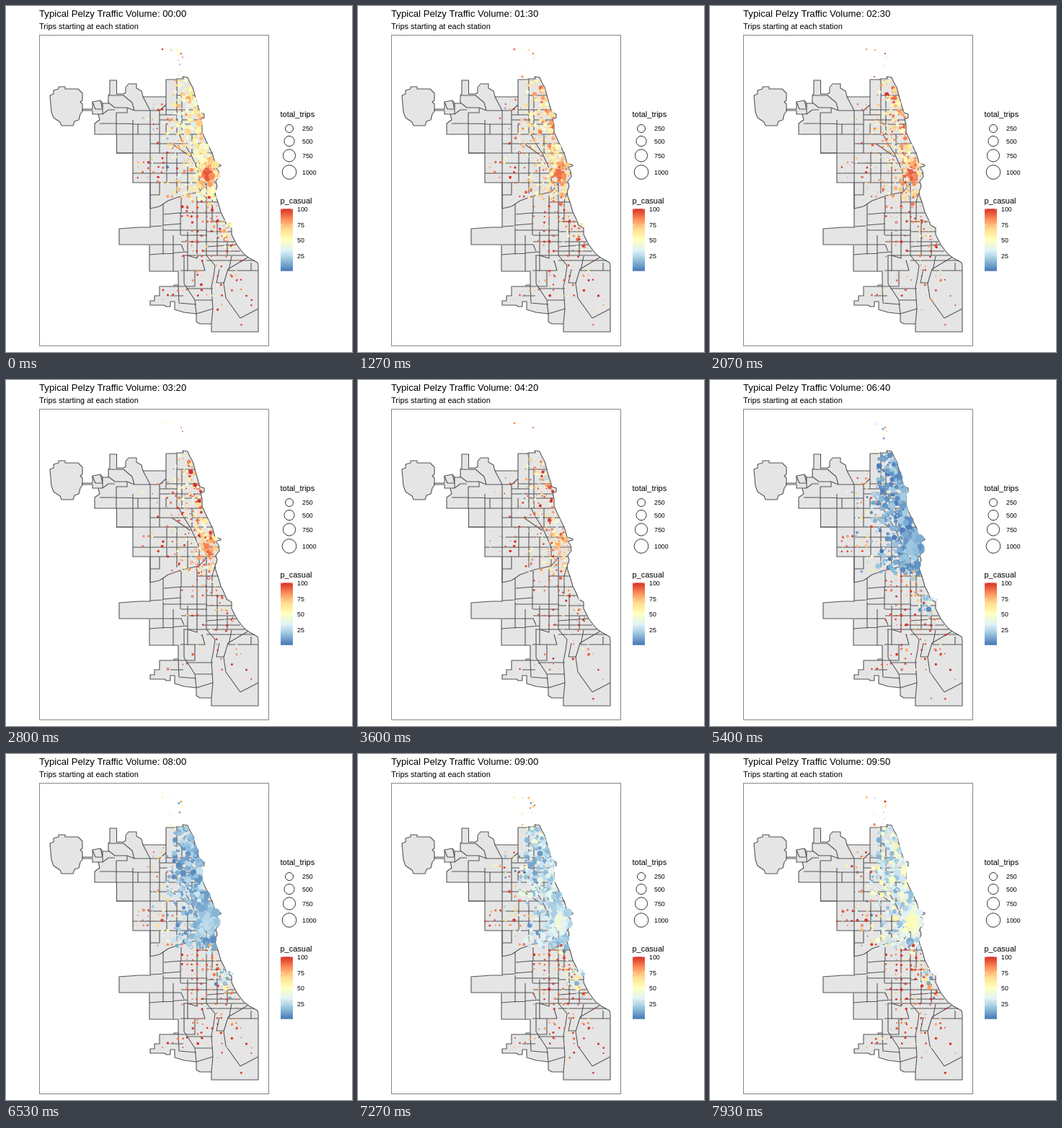
Write an HTML page that moves like this. It is 480 by 480 pixels and loops after 8000 ms.

```html
<!DOCTYPE html>
<html lang="en">
<head>
<meta charset="utf-8">
<title>Traffic volume map</title>
<style>
html, body { margin: 0; width: 100%; height: 100%; overflow: hidden; background: #fff; }
svg { display: block; width: 100vw; height: 100vh; }
text { font-family: "Liberation Sans", Arial, sans-serif; font-size: 11px; fill: #000; }
.title { font-size: 13.2px; }
.label { font-size: 8.8px; }
.map { fill: #e5e5e5; stroke: #555; stroke-width: 1.1; stroke-linejoin: round; }
.lines { fill: none; }
</style>
</head>
<body>
<svg viewBox="0 0 480 480">
  <defs><linearGradient id="ramp" x1="0" y1="1" x2="0" y2="0"></linearGradient></defs>
  <rect width="480" height="480" fill="#fff"/>
  <text class="title" id="title" x="46" y="15"></text>
  <text x="46" y="32">Trips starting at each station</text>
  <g class="map" id="map"></g>
  <g id="dots"></g>
  <rect x="46.5" y="40.5" width="318" height="431" fill="none" stroke="#858585"/>
  <g id="legend">
    <text x="380.5" y="154">total_trips</text>
    <text x="380.5" y="274">p_casual</text>
    <rect x="381" y="281.3" width="17" height="86.4" fill="url(#ramp)"/>
  </g>
</svg>
<script>
const FRAMES = 120, STEP = 8000 / FRAMES, MINUTES = 4.965;
const $ = id => document.getElementById(id);

function add(parent, tag, attrs, text) {
  const el = document.createElementNS('http://www.w3.org/2000/svg', tag);
  for (const key in attrs) el.setAttribute(key, attrs[key]);
  if (text) el.textContent = text;
  return parent.appendChild(el);
}

const mix = (a, b, f) => a + (b - a) * f;
const clamp = (v, lo, hi) => Math.max(lo, Math.min(hi, v));

// Rows are sorted by their first value; all columns are interpolated.
function sample(rows, v) {
  let i = 1;
  while (i < rows.length - 1 && rows[i][0] < v) i++;
  const a = rows[i - 1], b = rows[i];
  const f = clamp((v - a[0]) / (b[0] - a[0]), 0, 1);
  return a.map((n, c) => mix(n, b[c], f));
}

function hash(a, b) {
  let h = Math.imul(a + 1, 0x9E3779B1) ^ Math.imul(b + 7, 0x85EBCA6B);
  h = Math.imul(h ^ h >>> 15, 0x2C1B3C6D);
  h = Math.imul(h ^ h >>> 12, 0x297A2D39);
  return ((h ^ h >>> 15) >>> 0) / 4294967296;
}

// Map: shoreline rows are [y, x].
const shore = [
  [99, 252], [106, 255], [113, 259], [120, 261], [128, 263], [138, 266], [148, 269],
  [150, 275], [155, 275], [157, 270], [165, 272], [175, 272], [186, 277], [196, 282],
  [207, 287], [218, 290], [220.5, 298], [222, 298], [224, 291], [229, 295], [237, 296],
  [243, 291], [250, 293], [258, 290], [264, 291], [272, 294], [286, 298], [296, 303],
  [304, 306], [308, 313], [317, 313], [323, 316], [331, 320], [339, 326], [345, 331],
  [350, 338], [356, 349]
];
const airport = 'M61 124l5-2v-5l7-2v-3h9v3h18l3 3 3 3v10l-3 2 3 3v10l-3 4-2 8-6 2-2 6H77l-2-5-9-6-3-8z';
const north = 'M106 143H120V133L131 131L134 135H142V124L144 122V103H153.5V122H163L166 120V113L170 108H181V114L188 118L190 126H222V102H236V101H246L245 98';
const south = 'L350 361V452H285V441H269L264 438V427L247 425L234 421V410H228V417H222L220 415H200V409H206V402H213V389H233V387H239V368H199V331H157V309L185 307H200V245H176V204H153.5V178H123V163L130 158L128 150H120V145H106z';
const areas = [
  'M120 133L124 143H134L131 131M134 135V150H128M142 124H163L175 134L178 145M142 134L151 141H168V148H153V178M168 141L178 145H200L190 126M134 150L142 144H151M130 163H153L200 164M153 178H272M176 158V204M153 204H287M183 164V178M200 145V281',
  'M200 145H213L222 137V126M213 145V151H222V137M222 144H267M237 102V178M237 124H262M244 124V178M237 158H270M222 151H237M200 164H213V158H237M213 151V204M222 164V178M237 164H272M200 191H252M240 178L247 191L256 205L262 218L268 232V258M230 191L256 209M256 191H279M258 178V204',
  'M176 232H295M200 218H290M223 204V245M237 204V260M200 245H291M252 218V262M213 245V262H200M200 281L213 278L225 270L245 263L268 258L278 246M218 275V305L200 306M219 289L242 287V318M243 263V287H298M265 259V313M278 246V346M290 258L286 272V300M265 272H294M278 299H304M278 286V313',
  'M218 304L243 302M218 311H279M243 318H279M200 331H243L247 340M218 307V345M199 345L252 341M252 313V346M232 318V368M265 313V350L252 346V368M243 327H317M293 299V346M278 313H313M246 346H331M272 340H325M307 327V346M278 334L320 331',
  'M278 346L290 360L288 375L285 390L287 420L285 441M335 349L308 365L302 385L305 405L325 433M313 347L309 367H350M278 353H345M242 367H276L272 353M247 346V385L262 408L264 427M239 387L240 412L264 414M250 392H287M262 408H287M264 427L287 420M233 389H262V367M296 365L292 384H302M228 402H246M325 433L350 420M340 356V367'
];
add($('map'), 'path', { d: airport });
add($('map'), 'path', { d: north + shore.map(([y, x]) => `L${x} ${y}`).join('') + south });
add($('map'), 'path', { class: 'lines', d: areas.join('') });

// Colour scale
const ramp = [[69, 117, 180], [145, 191, 219], [224, 243, 248], [255, 255, 191],
  [254, 224, 144], [252, 141, 89], [215, 48, 39]].map((rgb, i) => [i / 6 * 100, ...rgb]);
const color = p => `rgb(${sample(ramp, p).slice(1).map(Math.round)})`;
ramp.forEach(([p]) => add($('ramp'), 'stop', { offset: p + '%', 'stop-color': color(p) }));

// Legend
[[250, 170, 5.5], [500, 187.5, 7.1], [750, 207.5, 8.6], [1000, 230.5, 9.8]].forEach(([n, y, r]) => {
  add($('legend'), 'circle', { cx: 393, cy: y, r, fill: 'none', stroke: '#000', 'stroke-width': .8 });
  add($('legend'), 'text', { class: 'label', x: 411, y: y + 3.2 }, n);
});
[100, 75, 50, 25].forEach((n, i) => {
  const y = 282 + i * 21.6;
  add($('legend'), 'path', { d: `M381 ${y}h3.4M394.6 ${y}h3.4`, stroke: '#fff', 'stroke-width': .5 });
  add($('legend'), 'text', { class: 'label', x: 404, y: y + 3.2 }, n);
});

// Stations
let seed = 0;
const rand = () => hash(seed++, 991);
const bell = () => (rand() + rand() + rand() + rand() - 2) * 1.7;
const lakeX = y => sample(shore, y)[1];
const snap = v => Math.round(v / 6.8) * 6.8 + (rand() - .5) * 2.4;
const stations = [];

function place(count, kind, spot) {
  for (let i = 0; i < count; i++) {
    const [x, y] = spot(i);
    const loop = Math.exp(-(((x - 281) / 9) ** 2) - ((y - 232) / 15) ** 2);
    const coast = Math.exp(-Math.max(0, lakeX(y) - x) / 24);
    stations.push({ x, y, kind, loop, coast, id: stations.length, u: rand(), order: rand() });
  }
}
const box = (x0, x1, y0, y1) => () => [snap(mix(x0, x1, rand())), snap(mix(y0, y1, rand()))];

const suburb = [[217, 60], [229, 61], [237, 61], [243, 66], [240, 68], [245, 71], [239, 75],
  [243, 73], [228, 83], [241, 81], [242, 90], [228, 98], [235, 103], [239, 96]];
place(suburb.length, 'edge', i => suburb[i]);
place(310, 'core', () => {
  const y = mix(102, 268, rand() ** .9);
  return [lakeX(y) - 3 - rand() ** 1.2 * Math.min(56, 18 + (y - 102) * .4), y];
});
place(85, 'core', () => {
  const y = 224 + bell() * 17;
  return [Math.min(lakeX(y) - 3, 273 + bell() * 9), y];
});
place(75, 'west', box(204, 236, 130, 266));
place(6, 'west', box(193, 204, 155, 166));
place(17, 'far', box(176, 200, 216, 240));
place(28, 'hyde', () => [302 + bell() * 6, 312 + bell() * 8]);
place(40, 'coast', () => {
  const y = mix(264, 344, rand());
  return [lakeX(y) - 3 - rand() * 20, y];
});
place(85, 'far', () => {
  const y = mix(268, 352, rand());
  return [snap(mix(243, lakeX(y) - 5, rand())), snap(y)];
});
place(44, 'far', box(247, 333, 345, 412));
place(9, 'far', box(218, 250, 392, 412));
place(12, 'far', box(268, 347, 385, 447));

stations.sort((a, b) => a.order - b.order);
stations.forEach(s => { s.el = add($('dots'), 'circle', { cx: s.x.toFixed(1), cy: s.y.toFixed(1) }); });

// hour, size, core share, loop share, spread, share of active stations, share of rings
const day = [
  [0, .78, 57, 97, 19, .84, .14],
  [1.5, .68, 67, 92, 20, .72, .25],
  [2.5, .62, 71, 94, 23, .62, .25],
  [4.33, .52, 76, 80, 40, .5, .28],
  [5.5, .7, 34, 48, 25, .66, .14],
  [6.67, 1.02, 12, 20, 10, .82, .05],
  [8, 1.05, 17, 24, 11, .87, .05],
  [9.83, 1, 34, 56, 17, .92, .06]
];
// pull towards 96 percent, extra spread
const kinds = { core: [0, 0], edge: [.35, 22], west: [.42, 30], hyde: [.08, 10], coast: [.5, 28], far: [.97, 12] };

function reading(s, bin) {
  const [, size, core, loop, spread, active] = sample(day, bin / 6);
  const [pull, extra] = kinds[s.kind];
  const noise = hash(s.id, bin);
  const mood = mix(hash(s.id, 501), hash(s.id, bin + 1000), .4) * 2 - 1;
  let p = mix(core, 96, pull) + mood * (spread + extra) * 1.6;
  p = mix(p, loop, s.loop);
  let r;
  if (s.kind === 'core') {
    r = size * (1.2 + 2.3 * s.u ** 1.5 + s.coast * 2.1 * (.3 + s.u) + 1.9 * s.loop) * mix(.75, 1.15, noise);
  } else if (s.kind === 'hyde') {
    r = size * (1 + 3.2 * s.u * s.u) * mix(.7, 1.1, noise);
  } else {
    const rise = s.kind === 'far' ? 1 : .7 + size * .5;
    r = rise * (.5 + 1.6 * mix(s.u, noise, .5));
  }
  const limit = s.kind === 'core' ? active + .1 : active * .8;
  if (mix(hash(s.id, 502), hash(s.id, bin + 2000), .45) > limit) r = 0;
  return [r, clamp(p, 0, 100)];
}

function draw(frame) {
  const minute = frame * MINUTES, bin = Math.floor(minute / 10), f = minute / 10 - bin;
  const two = n => String(n).padStart(2, '0');
  $('title').textContent = `Typical Pelzy Traffic Volume: ${two(Math.floor(bin / 6))}:${two(bin % 6 * 10)}`;
  const rings = sample(day, minute / 60)[6];
  for (const s of stations) {
    const a = reading(s, bin), b = reading(s, bin + 1);
    const r = mix(a[0], b[0], f), c = color(mix(a[1], b[1], f));
    const ring = r > 1.1 && r < 3.2 && hash(s.id, bin + 3000) < rings;
    s.el.setAttribute('r', (ring ? r - .5 : r).toFixed(2));
    s.el.setAttribute('fill', ring ? '#fbf3e6' : c);
    s.el.setAttribute('stroke', ring ? c : 'none');
  }
}

const start = performance.now();
let shown = -1;
function tick() {
  // Small lead: frame times are rounded to 10 ms.
  const frame = Math.floor((performance.now() - start + 4) / STEP) % FRAMES;
  if (frame !== shown) draw(shown = frame);
  requestAnimationFrame(tick);
}
tick();
</script>
</body>
</html>
```
